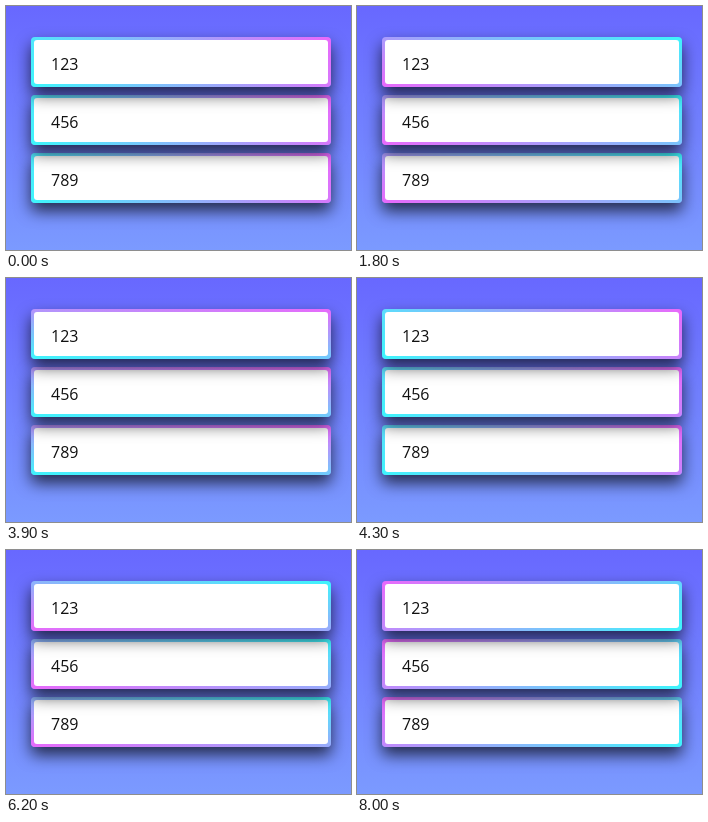
Animation of 345 by 244 pixels, one loop 8100 ms. Source, as an HTML page:

```html
<!DOCTYPE html>
<html lang="en">
<head>
<meta charset="utf-8">
<title>Rotating gradient borders</title>
<style>
  @property --angle {
    syntax: "<angle>";
    inherits: true;
    initial-value: 52deg;
  }

  html, body {
    margin: 0;
    width: 100%;
    height: 100%;
    overflow: hidden;
  }

  body {
    position: relative;
    background: linear-gradient(#6868ff, #7b9aff);
    font: 16px "Open Sans", "Noto Sans", sans-serif;
    color: #111;
    /* 80 degrees per second, sampled ten times a second */
    animation: spin 8100ms steps(81) infinite;
  }

  .card {
    position: absolute;
    left: 25px;
    box-sizing: border-box;
    width: 300px;
    height: 50px;
    padding-left: 17px;
    border: 3px solid transparent;
    border-radius: 4px;
    line-height: 48px;
    background:
      linear-gradient(#fff, #fff) padding-box,
      linear-gradient(var(--angle), #3cf6fc, #ea68fb) border-box;
    box-shadow: 0 8px 16px rgba(0, 0, 0, .7);
  }

  /* Upper cards cast their shadow over lower ones */
  .card:nth-child(1) { top: 31px; z-index: 3; }
  .card:nth-child(2) { top: 89px; z-index: 2; }
  .card:nth-child(3) { top: 147px; z-index: 1; }

  /* The inner white area keeps rounded corners */
  .card::before {
    content: "";
    position: absolute;
    inset: 0;
    z-index: -1;
    border-radius: 3px;
    background: #fff;
  }

  .card {
    background:
      linear-gradient(var(--angle), #3cf6fc, #ea68fb) border-box;
  }

  @keyframes spin {
    from { --angle: 52deg; }
    to { --angle: 700deg; }
  }
</style>
</head>
<body>
  <div class="card">123</div>
  <div class="card">456</div>
  <div class="card">789</div>
</body>
</html>
```
